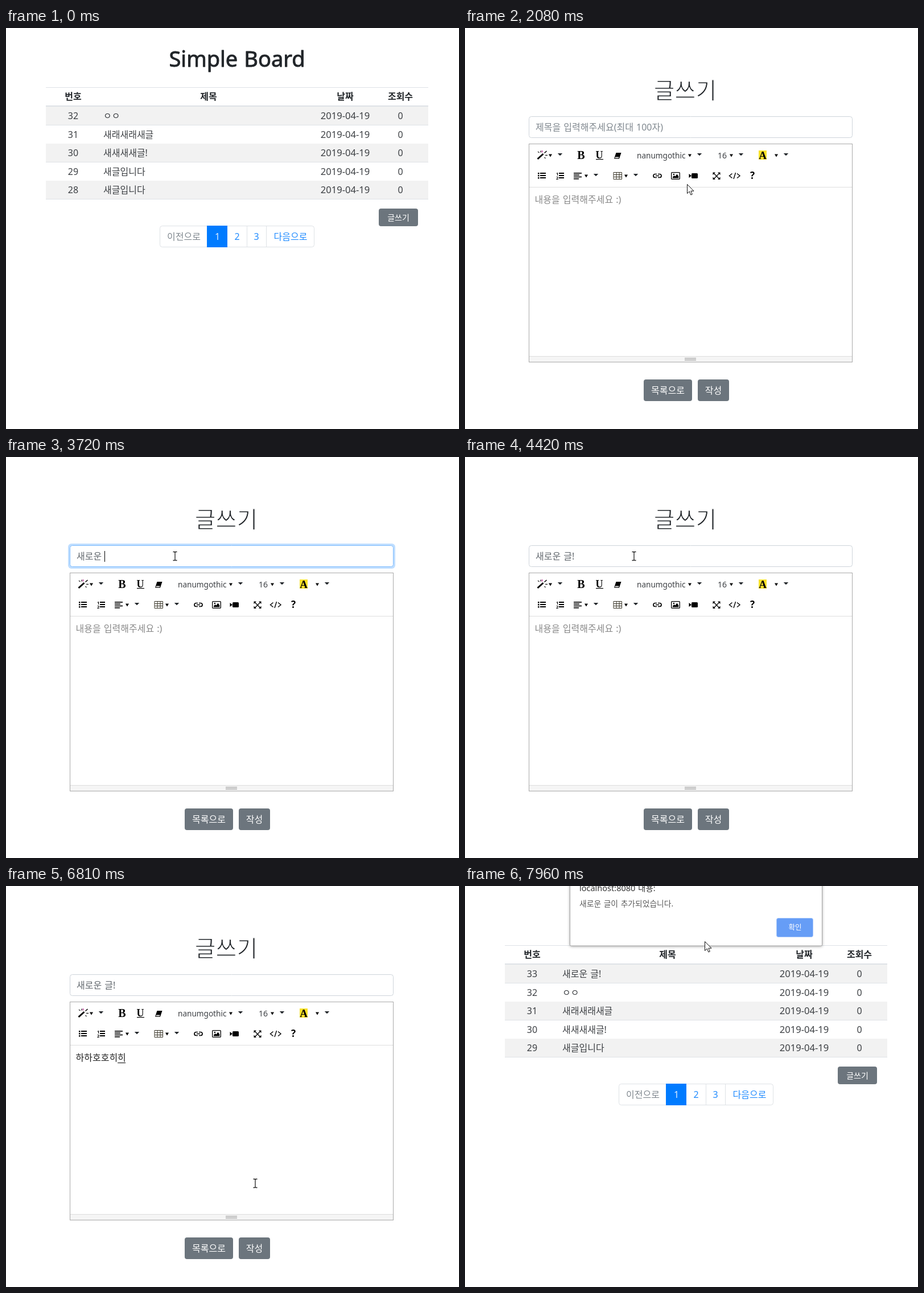
These frames come from a looping animation (796x704 px, 8 s). An HTML page with a canvas:

```html
<!DOCTYPE html>
<html lang="ko">
<head>
<meta charset="utf-8">
<title>Simple Board</title>
<style>
html, body { margin: 0; width: 100%; height: 100%; overflow: hidden; background: #fff; }
canvas { display: block; width: 796px; height: 704px; }
</style>
</head>
<body>
<canvas id="stage"></canvas>
<script>
const W = 796, H = 704, LOOP = 8000;
const canvas = document.getElementById('stage');
const dpr = window.devicePixelRatio || 1;
canvas.width = W * dpr;
canvas.height = H * dpr;
const c = canvas.getContext('2d');

const SANS = '"Noto Sans", "Noto Sans CJK KR", "Noto Sans CJK", sans-serif';
const LIGHT = '"Noto Sans Light", "Noto Sans", "Noto Sans CJK KR Light", "Noto Sans CJK KR", "Noto Sans CJK", sans-serif';
const SERIF = '"Liberation Serif", serif';
const INK = '#212529', GRAY = '#6c757d', BLUE = '#007bff', LINE = '#dee2e6';
const FORM_AT = 1850, LIST_AT = 7510;

// An edge in the ink colour thickens the glyphs, one in the page colour thins them.
function text(s, x, y, { size = 16, weight = 300, color = INK, align = 'left', family, edge, edgeWidth = 1 } = {}) {
  c.save();
  c.font = `${weight} ${size}px ${family || (weight < 400 ? LIGHT : SANS)}`;
  c.wordSpacing = '1px';
  c.fillStyle = color;
  c.textAlign = align;
  if (weight < 400 && !edge) c.globalAlpha *= 0.87;
  c.fillText(s, x, y);
  if (edge) {
    c.strokeStyle = edge;
    c.lineWidth = edgeWidth;
    c.lineJoin = 'round';
    c.strokeText(s, x, y);
  }
  c.restore();
}

function widthOf(s) {
  c.save();
  c.font = `300 16px ${LIGHT}`;
  c.wordSpacing = '1px';
  const w = c.measureText(s).width;
  c.restore();
  return w;
}

function rect(x, y, w, h, color) {
  c.fillStyle = color;
  c.fillRect(x, y, w, h);
}

function round(x, y, w, h, r, fill, stroke, line = 1) {
  c.beginPath();
  c.roundRect(x, y, w, h, r);
  if (fill) { c.fillStyle = fill; c.fill(); }
  if (stroke) { c.strokeStyle = stroke; c.lineWidth = line; c.stroke(); }
}

function shape(d, fill, stroke, line = 1) {
  const p = new Path2D(d);
  if (fill) { c.fillStyle = fill; c.fill(p); }
  if (stroke) { c.strokeStyle = stroke; c.lineWidth = line; c.stroke(p); }
}

function button(label, x, y, w, h, size) {
  round(x, y, w, h, 4, GRAY);
  text(label, x + w / 2, y + h / 2 + size * 0.36, { size, weight: 400, color: '#fff', align: 'center' });
}

// ---- list page

const TITLES = ['새로운 글!', 'ㅇㅇ', '새래새래새글', '새새새새글!', '새글입니다', '새글입니다'];

function drawList(first) {
  text('Simple Board', 406, 67.5, { size: 38, weight: 500, align: 'center', edge: INK, edgeWidth: 0.9 });
  rect(70, 104, 672, 1, LINE);
  rect(70, 136, 672, 2, LINE);
  [['번호', 118], ['제목', 356], ['날짜', 596], ['조회수', 693]].forEach(([s, x]) =>
    text(s, x, 126, { weight: 700, align: 'center' }));

  const mid = { align: 'center' };
  for (let i = 0; i < 5; i++) {
    const top = Math.floor(138 + 32.5 * i), bottom = Math.floor(138 + 32.5 * (i + 1));
    const y = bottom - 10;
    if (i % 2 === 0) rect(70, top, 672, bottom - top, '#f2f2f2');
    rect(70, bottom, 672, 1, LINE);
    text(first - i, 118, y, mid);
    text(TITLES[33 - first + i], 171, y);
    text('2019-04-19', 596, y, { size: 16.6, align: 'center' });
    text('0', 693, y, mid);
  }

  button('글쓰기', 655, 317, 69, 31, 14);
  round(270.5, 347.5, 271, 37, 4, '#fff', LINE);
  rect(423, 347, 1, 38, LINE);
  rect(457, 347, 1, 38, LINE);
  rect(353, 347, 36, 38, BLUE);
  text('이전으로', 283, 372, { color: GRAY });
  text('1', 371.5, 372, { color: '#fff', align: 'center' });
  text('2', 406, 372, { color: BLUE, align: 'center' });
  text('3', 440, 372, { color: BLUE, align: 'center' });
  text('다음으로', 470.5, 372, { color: BLUE });
}

// ---- editor toolbar

function carets(x, gap = 17) {
  shape(`M${x - 3} 221.5h6l-3 5z`, '#000');
  shape(`M${x + gap - 4.2} 220h8.4l-4.2 4.2z`, INK);
}

function drawTopTools() {
  shape('M127.5 230L137.5 221', null, '#000', 3);
  shape('M128 217l2.5 2M133 215.5v3M141 223.5h4M139.5 227l2 2', null, '#333', 1.4);
  shape('M135.5 215v3.5', null, '#c03a9a', 1.6);
  shape('M139.5 219.5l4-3.5', null, '#000', 1.6);
  carets(150);
  text('B', 204, 230, { size: 20, weight: 700, color: '#000', align: 'center', family: SERIF });
  text('U', 236, 229, { size: 18, weight: 700, color: '#000', align: 'center', family: SERIF });
  rect(230, 230, 13, 1.2, '#000');
  shape('M265.5 219h9l-3.5 10.5h-9z', '#000');
  shape('M264 226.5h6.5l-.6 1.8h-6.5z', '#fff');
  text('nanumgothic', 302, 229, { size: 13.6 });
  carets(395);
  text('16', 444, 229, { size: 14 });
  carets(468);
  rect(516, 215, 14, 16, '#fae32b');
  text('A', 523, 230, { size: 19, weight: 700, color: '#000', align: 'center', family: SERIF });
  carets(547);
}

function drawBottomTools() {
  for (let i = 0; i < 3; i++) {
    const y = 255 + i * 4;
    rect(128, y - 1, 2.5, 2.5, '#000');
    rect(132, y - 1, 10, 2, '#000');
    rect(165, y - 1, 9, 2, '#000');
  }
  text('1', 160, 259, { size: 7.5, weight: 700, color: '#000' });
  text('2', 160, 266, { size: 7.5, weight: 700, color: '#000' });
  [14, 10, 14, 9].forEach((w, i) => rect(191, 254 + i * 3.3, w, 1.7, '#000'));

  c.save();
  c.translate(0, 36);
  carets(213);
  carets(283);
  c.restore();

  shape('M261 253.5h14.5v12h-14.5zM261 257.5h14.5M261 261.5h14.5M266 253.5v12M271 253.5v12', null, '#3a3629');
  shape('M337 256.5h-3a3 3 0 0 0 0 6h3M339 256.5h3a3 3 0 0 1 0 6h-3M335 259.5h6', null, '#000', 1.7);
  round(362.7, 253.7, 14.6, 11.6, 1, '#fff', '#000', 1.3);
  shape('M365 263.5v-2l2.5-2.5 2 1.5 3-4 2.8 4v3z', '#000');
  shape('M368.2 257a1.3 1.3 0 1 1-2.6 0a1.3 1.3 0 1 1 2.6 0', '#000');
  round(398, 255, 11, 9, 1.5, '#000');
  shape('M393.5 256l4.5 3.5-4.5 3.5z', '#000');
  shape('M437 255l10 10M447 255l-10 10', null, '#000', 1.4);
  shape('M435.5 253.5h4.5l-4.5 4.5zM448.5 253.5h-4.5l4.5 4.5zM435.5 266h4.5l-4.5-4.5zM448.5 266h-4.5l4.5-4.5z', '#000');
  shape('M469.5 255.5l-5 4 5 4M478 255.5l5 4-5 4M475.5 254l-3.5 11', null, '#000', 1.4);
  text('?', 505, 265, { size: 17, weight: 700, color: '#000', align: 'center' });
}

// ---- typing

// Each run: start, end, then the text after every evenly spaced keystroke.
const TITLE_RUNS = [
  [3180, 3570, ['ㅅ', '새', '샐', '새로', '새롱', '새로운']],
  [3720, 3945, ['새로운 ', '새로운 ㄱ', '새로운 그', '새로운 글']],
  [4190, 4190, ['새로운 글!']]
];
const BODY_RUNS = [
  [4950, 5180, ['ㅎ', '하', '핳', '하하']],
  [5350, 5350, ['하하호']],
  [5500, 5500, ['하하호호']],
  [5670, 5890, ['하하호홓', '하하호호히', '하하호호힣', '하하호호히히']]
];

function stepOf(t, from, to, count) {
  const gap = count > 1 ? (to - from) / (count - 1) : 1;
  return Math.min(count - 1, Math.floor((t - from) / gap + 0.01));
}

function typed(runs, t) {
  let value = '', at = 0;
  for (const [from, to, states] of runs) {
    if (t < from) break;
    const k = stepOf(t, from, to, states.length);
    value = states[k];
    at = from + (states.length > 1 ? k * (to - from) / (states.length - 1) : 0);
  }
  return { value, at };
}

// The last syllable is underlined while composing, with the caret before it.
function field(value, x, y, color, composing, caret) {
  text(value, x, y, { color });
  const open = composing && /[ㄱ-ㅎ가-힣]$/.test(value);
  const left = x + widthOf(open ? value.slice(0, -1) : value);
  if (open) rect(left, y + 3, 14, 1, color);
  if (caret) rect(Math.round(left), y - 15, 1, 19, '#000');
}

const blink = (t, since) => Math.floor((t - since) / 535) % 2 === 0;

const RECENT = ['새글입니다', '새새새새글!', '새래새래새글', 'ㅇㅇ', 'ㅇㅇㅇ', '글입니다', '글', '안녕하세요'];

function drawSuggestions(t) {
  if (t < 2550 || t >= 3720) return;
  const rows = t < 3258 ? 8 : 3;
  const h = rows === 8 ? 233 : 90;
  round(110.5, 193.5, 119, h - 1, 1, '#fff', '#bdbdbd');
  for (let i = 0; i < rows; i++) text(RECENT[i], 122, 213 + i * 29, { size: 14, weight: 400 });
}

// ---- form page

function drawForm(t) {
  text('글쓰기', 387, 124, { size: 40, align: 'center', edge: '#fff', edgeWidth: 1.2 });

  const focused = t >= 2460 && t < 4420;
  if (focused) round(109, 152, 575, 44, 6, '#bfdeff');
  round(112.5, 155.5, 568, 37, 4, '#fff', focused ? '#80bdff' : '#ced4da');
  const title = typed(TITLE_RUNS, t);
  if (!title.value) text('제목을 입력해주세요(최대 100자)', 124, 180, { color: GRAY });
  field(title.value, 124, 180, '#495057', t < 4190, focused && blink(t, title.at || 2460));

  c.strokeStyle = '#a9a9a9';
  c.lineWidth = 1;
  c.strokeRect(112.5, 203.5, 568, 383);
  rect(113, 279, 567, 1, '#ddd');
  drawTopTools();
  drawBottomTools();

  const body = typed(BODY_RUNS, t);
  if (!body.value) text('내용을 입력해주세요 :)', 122.5, 307, { color: '#777' });
  const editing = t >= 4490 && t < 7190;
  field(body.value, 122.5, 307, '#000', editing, editing && blink(t, body.at || 4490));

  rect(113, 576, 567, 10, '#f5f5f5');
  rect(113, 576, 567, 1, '#ddd');
  for (let i = 0; i < 3; i++) rect(386, 579 + i * 2, 20, 1, '#a9a9a9');

  button('목록으로', 314, 617, 85, 38, 16);
  if (t >= 7190) round(405.8, 613.8, 61.4, 44.4, 7, 'rgba(108,117,125,.5)');
  button('작성', 409, 617, 55, 38, 16);
  drawSuggestions(t);
}

// ---- alert

function drawAlert(t) {
  const p = Math.min(1, Math.max(0, (t - 7586) / 220));
  if (!p) return;
  c.save();
  c.globalAlpha = p;
  c.translate(0, -17 * (1 - p) ** 2);
  c.save();
  c.shadowColor = 'rgba(0,0,0,.4)';
  c.shadowBlur = 5 * dpr;
  c.shadowOffsetY = dpr;
  round(184.5, -30, 443, 135, 2, '#fff');
  c.restore();
  round(184.5, -30, 443, 135, 2, null, '#a5a5a5');
  text('localhost:8080 내용:', 201, 9, { size: 14.5, weight: 400, color: '#333' });
  text('새로운 글이 추가되었습니다.', 201, 36, { size: 13.8, color: '#444' });
  round(547.5, 56.5, 64, 33, 3, '#669df6', '#a9c8fa');
  text('확인', 580, 77, { size: 12.5, weight: 400, color: '#fff', align: 'center' });
  c.restore();
}

// ---- mouse

// start, end, steps, then the place reached
const MOVES = [
  [240, 240, 1, 701, 655],
  [316, 620, 5, 488, 391],
  [760, 990, 4, 717, 330],
  [1300, 1380, 2, 706, 330],
  [1530, 1530, 1, 704, 330],
  [1850, 2080, 4, 390, 274],
  [2157, 2310, 3, 297, 174],
  [6350, 6350, 1, 310, 150],
  [6427, 6580, 3, 400, 136],
  [6657, 6810, 3, 438, 522],
  [6885, 7120, 4, 460, 636],
  [7190, 7360, 3, 448, 643],
  [7510, 7590, 2, 370, 350],
  [7660, 7960, 5, 421, 97]
];

function mouseAt(t) {
  let pos = null;
  for (const [from, to, steps, x, y] of MOVES) {
    if (t < from) break;
    const f = (stepOf(t, from, to, steps) + 1) / steps;
    pos = pos ? [pos[0] + (x - pos[0]) * f, pos[1] + (y - pos[1]) * f] : [x, y];
  }
  return pos && pos.map(Math.round);
}

const inside = ([x, y], l, t, r, b) => x >= l && x <= r && y >= t && y <= b;

function drawMouse(t, onForm) {
  const p = mouseAt(t);
  if (!p) return;
  const hand = onForm
    ? inside(p, 314, 617, 399, 655) || inside(p, 409, 617, 464, 655)
    : inside(p, 655, 317, 724, 348) || inside(p, 390, 348, 541, 384);
  const beam = onForm && (inside(p, 112, 155, 681, 192) || inside(p, 113, 280, 680, 576));
  c.save();
  c.translate(p[0], p[1]);
  if (beam) {
    shape('M-3.5-7.5H-1L0-6.5L1-7.5H3.5M-3.5 7.5H-1L0 6.5L1 7.5H3.5M0-6.5V6.5', null, '#222', 1.3);
  } else if (hand) {
    c.translate(-6, 0);
    shape('M5 1.5Q6.5 0 8 1.5V8Q10 7 11 8.5Q13 7.8 14 9.5Q16.5 9 16.5 11V15L14.5 19V22H6V19L1 12.5Q0 10 2 10Q3.5 10 5 12ZM8 8V11M11 8.5V11.5M14 9.5V12', '#fff', '#000');
  } else {
    shape('M.5.5V16.5L4.3 13L6.8 19L9.3 18L6.9 12.2H12Z', '#fff', '#111');
  }
  c.restore();
}

function draw(t) {
  c.setTransform(dpr, 0, 0, dpr, 0, 0);
  rect(0, 0, W, H, '#fff');
  const onForm = t >= FORM_AT && t < LIST_AT;
  if (onForm) drawForm(t);
  else drawList(t < FORM_AT ? 32 : 33);
  if (t >= LIST_AT) drawAlert(t);
  drawMouse(t, onForm);
}

function tick() {
  draw(performance.now() % LOOP);
  requestAnimationFrame(tick);
}
tick();
</script>
</body>
</html>
```
